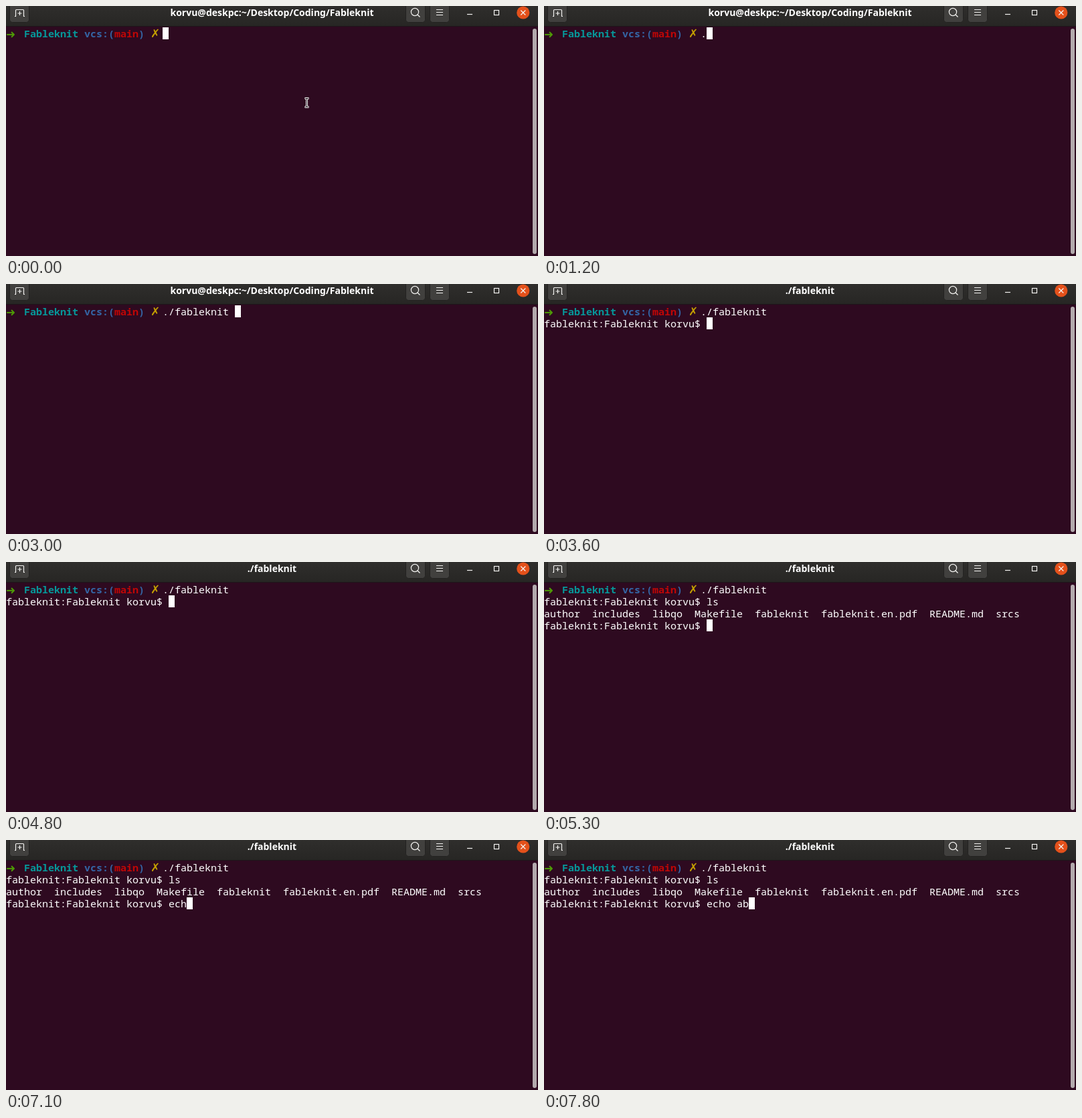
Write an HTML page that moves like this. It is 795 px wide and 375 px high and loops after 8 s.

```html
<!DOCTYPE html>
<html lang="en">
<head>
<meta charset="utf-8">
<title>Terminal</title>
<style>
  html, body { margin: 0; width: 100%; height: 100%; overflow: hidden; background: #2e0a20; }
  svg { display: block; }
  text { white-space: pre; fill: #fff; font: 15px "Noto Sans Mono", "DejaVu Sans Mono", monospace; }
  .bold { font-weight: 700; }
  .sign { font: 700 17px "DejaVu Sans", sans-serif; }
  #title { font: 700 14px "Noto Sans", "Open Sans", sans-serif; text-anchor: middle; }
  .green { fill: #4e9a06; }
  .cyan { fill: #06989a; }
  .blue { fill: #3465a4; }
  .red { fill: #c00606; }
  .yellow { fill: #c4a000; }
  .button { fill: #41403e; stroke: #232221; }
  .icon { fill: none; stroke: #f4f3f1; stroke-width: 1.2; }
</style>
</head>
<body>
<svg width="795" height="375" viewBox="0 0 795 375">
  <defs>
    <linearGradient id="bar" x2="0" y2="1">
      <stop stop-color="#2f2e2c"/>
      <stop offset="1" stop-color="#272624"/>
    </linearGradient>
  </defs>
  <rect width="795" height="375" fill="#2e0a20"/>

  <rect width="795" height="30" fill="url(#bar)"/>
  <rect y="30" width="795" height="1" fill="#1d1519"/>
  <g class="button">
    <rect x="5.5" y="-6" width="29" height="30.5" rx="4"/>
    <rect x="597.5" y="-6" width="29" height="30.5" rx="4"/>
    <rect x="633.5" y="-6" width="29" height="30.5" rx="4"/>
  </g>
  <g class="icon">
    <path d="M13 15.5h1.5v-9q0-1 1-1h10q1 0 1 1v9h1.5M20.5 8v6M17.5 11h6"/>
    <circle cx="611" cy="9" r="5.6"/>
    <path d="M615 13l3.5 3.5"/>
    <path d="M643 5.5h10M643 9.5h10M643 13.5h10"/>
    <path d="M689 12.5h8"/>
    <rect x="729.5" y="6.5" width="7" height="7"/>
  </g>
  <circle cx="772.8" cy="10" r="9.6" fill="#e4511b"/>
  <path class="icon" d="M769.3 6.5l7 7M776.3 6.5l-7 7"/>
  <text id="title" x="397.5" y="15"></text>

  <rect x="787" y="34" width="6" height="338" rx="3" fill="#b3aaad"/>

  <text class="sign green" x="0" y="48">➜</text>
  <text class="bold cyan" x="27" y="47">Fableknit</text>
  <text class="bold blue" x="117" y="47">vcs:(</text>
  <text class="bold red" x="162" y="47">main</text>
  <text class="bold blue" x="198" y="47">)</text>
  <text class="sign yellow" x="216" y="47">✗</text>

  <text id="row0" x="234" y="47"></text>
  <text id="row1" x="0" y="65"></text>
  <text id="row2" x="0" y="83"></text>
  <text id="row3" x="0" y="101"></text>
  <rect id="cursor" width="9" height="18" fill="#fff"/>

  <g id="pointer" fill="none">
    <path d="M446.5 138.5h6M446.5 151.5h6M449.5 138v14" stroke="#fff" stroke-width="3"/>
    <path d="M447 138.5h5M447 151.5h5M449.5 138v14" stroke="#1a1016"/>
  </g>
</svg>
<script>
const LOOP = 8000, CELL = 9, LINE = 18, TOP = 32;
const POINTER_HIDDEN = 1100;
const COMMAND = './fableknit ';
const PROMPT = 'fableknit:Fableknit korvu$ ';
const FILES = 'author  includes  libqo  Makefile  fableknit  fableknit.en.pdf  README.md  srcs';

// Each stage is one input line: its row and the column where typing begins.
const stages = [
  { row: 0, col: 26, title: 'korvu@deskpc:~/Desktop/Coding/Fableknit' },
  { row: 1, col: PROMPT.length, title: './fableknit' },
  { row: 3, col: PROMPT.length, title: './fableknit' }
];

// start time, stage, typed text, cursor visible
const steps = [
  [0, 0, '', true],
  [100, 0, '', false],
  [700, 0, '', true],
  [1200, 0, '.', true],
  [1600, 0, './', true],
  [2200, 0, './', false],
  [2800, 0, './f', true],
  [3000, 0, COMMAND, true],
  [3600, 1, '', true],
  [4200, 1, '', false],
  [4800, 1, '', true],
  [5000, 1, 'l', true],
  [5100, 1, 'ls', true],
  [5300, 2, '', true],
  [5800, 2, '', false],
  [6500, 2, '', true],
  [6700, 2, 'e', true],
  [7100, 2, 'ech', true],
  [7200, 2, 'echo', true],
  [7400, 2, 'echo ', true],
  [7600, 2, 'echo a', true],
  [7800, 2, 'echo ab', true]
];

const byId = id => document.getElementById(id);
const cursor = byId('cursor');
const pointer = byId('pointer');
const setText = (id, value) => {
  const node = byId(id);
  if (node.textContent !== value) node.textContent = value;
};

function draw(time) {
  const [, index, typed, lit] = steps.findLast(step => step[0] <= time);
  const stage = stages[index];

  setText('title', stage.title);
  setText('row0', index === 0 ? typed : COMMAND);
  setText('row1', ['', PROMPT + typed, PROMPT + 'ls'][index]);
  setText('row2', index === 2 ? FILES : '');
  setText('row3', index === 2 ? PROMPT + typed : '');

  cursor.setAttribute('x', (stage.col + typed.length) * CELL);
  cursor.setAttribute('y', TOP + stage.row * LINE);
  cursor.setAttribute('visibility', lit ? 'visible' : 'hidden');
  pointer.setAttribute('visibility', time < POINTER_HIDDEN ? 'visible' : 'hidden');
}

function tick() {
  draw(performance.now() % LOOP);
  requestAnimationFrame(tick);
}
tick();
</script>
</body>
</html>
```
